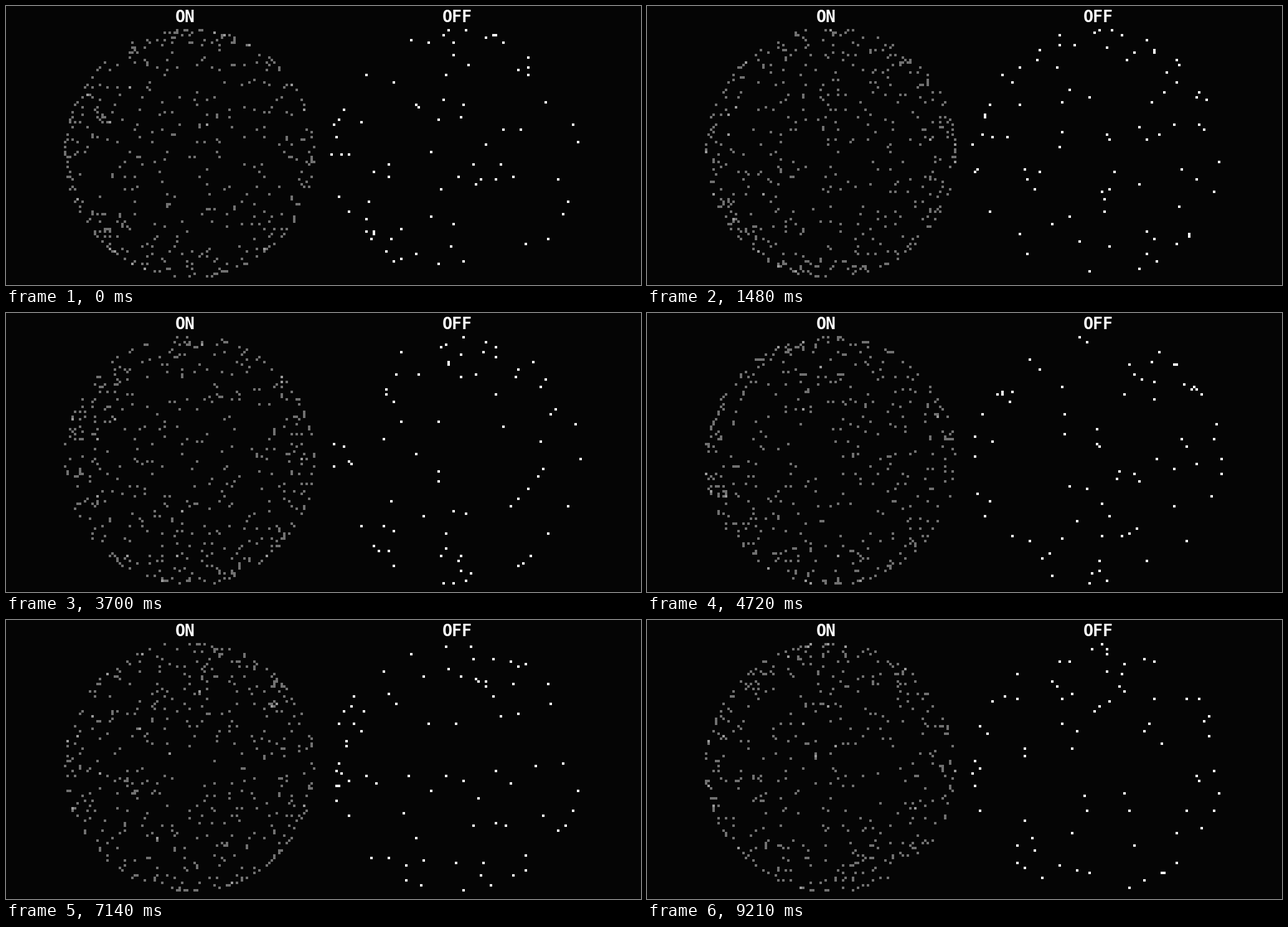
A matplotlib script that plays this animation: 1020x449 px, repeating every 9260 ms.

```python
import matplotlib.pyplot as plt
import numpy as np
from matplotlib.animation import FuncAnimation

W, H, DPI = 1020, 449, 64
FRAMES, LOOP_MS = 200, 9260
CELL, RADIUS = 4, 50          # pixels per cell, sphere radius in cells
LEFT, RIGHT, TOP = 93, 521, 37
SAMPLES, POINTS = 6, 154      # exposures blended on the left, points per exposure
BACK = 5 / 255
GAMMA = 2.2


def sphere_hits(rng):
    """Mark the cells hit by the visible half of random surface points."""
    z = rng.uniform(-1, 1, POINTS)
    z = z[z > 0]
    angle = rng.uniform(0, 2 * np.pi, z.size)
    r = np.sqrt(1 - z * z)
    col = np.rint(RADIUS * (1 + r * np.cos(angle))).astype(int)
    row = np.floor(RADIUS * (1 + r * np.sin(angle))).astype(int)
    hits = np.zeros((2 * RADIUS, 2 * RADIUS + 1))
    hits[np.clip(row, 0, 2 * RADIUS - 1), col] = 1
    return hits


def stamp(canvas, light, x):
    """Place a grid of linear light values on the canvas, cell by cell."""
    tone = np.maximum(light ** (1 / GAMMA), BACK)
    block = np.kron(tone, np.ones((CELL, CELL)))
    h, w = block.shape
    canvas[TOP:TOP + h, x:x + w] = block


def render(frame):
    rng = np.random.default_rng(1000 + frame)
    canvas = np.full((H, W), BACK)
    canvas[-1] = 0
    blend = sum(sphere_hits(rng) for _ in range(SAMPLES)) / SAMPLES
    stamp(canvas, blend, LEFT)
    stamp(canvas, sphere_hits(rng), RIGHT)
    return canvas


def label(x, text):
    fig.text(x / W, 1 - 26 / H, text, color="white", ha="center", va="baseline",
             family="DejaVu Sans Mono", weight="bold", size=26.5 * 72 / DPI)


def update(frame):
    picture.set_data(render(frame))
    return [picture]


fig = plt.figure(figsize=(W / DPI, H / DPI), dpi=DPI, facecolor=(BACK,) * 3)
ax = fig.add_axes([0, 0, 1, 1])
ax.axis("off")
picture = ax.imshow(render(0), cmap="gray", vmin=0, vmax=1,
                    interpolation="nearest", aspect="auto")
label(288, "ON")
label(724.5, "OFF")

anim = FuncAnimation(fig, update, frames=FRAMES, interval=LOOP_MS / FRAMES,
                     repeat=True, repeat_delay=0)
plt.show()
```
